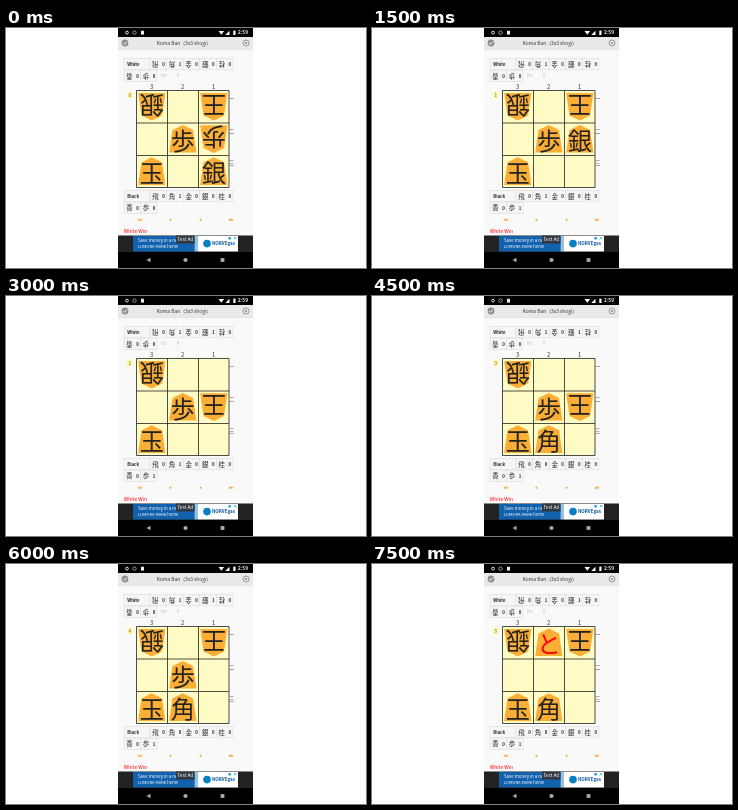
These frames come from a looping animation (360 by 240 pixels, 8000 ms). An HTML page:

```html
<!DOCTYPE html>
<html lang="ja">
<head>
<meta charset="utf-8">
<title>Mini shogi replay</title>
<style>
html, body { margin: 0; width: 100%; height: 100%; overflow: hidden; background: #fff; }
svg { display: block; width: 100vw; height: 100vh; }
text { font-family: "Noto Sans CJK JP", "Noto Sans CJK", "Noto Sans", sans-serif; }
</style>
</head>
<body>
<svg id="stage" viewBox="0 0 360 240"></svg>
<script>
const NS = 'http://www.w3.org/2000/svg';
const stage = document.getElementById('stage');
const LOOP = 8000, STEP = 1500;

function add(tag, attrs, parent = stage) {
  const node = document.createElementNS(NS, tag);
  for (const key in attrs) node.setAttribute(key, attrs[key]);
  return parent.appendChild(node);
}
const rect = (x, y, width, height, fill, more = {}) =>
  add('rect', { x, y, width, height, fill, ...more });
const circle = (cx, cy, r, fill, more = {}) => add('circle', { cx, cy, r, fill, ...more });
const path = (d, fill, more = {}) => add('path', { d, fill, ...more });
function text(value, x, y, size, fill = '#333', more = {}, parent = stage) {
  const node = add('text', { x, y, 'font-size': size, fill, ...more }, parent);
  node.textContent = value;
  return node;
}
const middle = { 'text-anchor': 'middle' };
const bold = { 'font-weight': 700 };

function drawPhone() {
  rect(112, 0, 135, 240, '#f9f9f9');
  rect(112, 0, 135, 9, '#000');
  circle(121, 4.6, 1.4, 'none', { stroke: '#ddd', 'stroke-width': 1 });
  circle(128.5, 4.6, 1.7, 'none', { stroke: '#bbb', 'stroke-width': .8 });
  rect(135, 2.8, 3, 3.8, '#eee');
  path('M212.5 3h5.6l-2.8 3.8z', '#fff');
  path('M223.5 2.7v4.2h-4.2z', '#fff');
  rect(227.3, 2.6, 2.2, 4.4, '#fff');
  text('2:59', 237, 6.4, 4.7, '#fff', { ...middle, ...bold });

  rect(112, 9, 135, 13, '#e9e9e9');
  rect(112, 21.6, 135, .5, '#ddd');
  text('Koma Ban（3x3 shogi）', 178, 17.2, 4.9, '#333', { ...middle, 'font-weight': 500 });
  circle(119, 15, 3.4, '#8c8c8c');
  path('M117.2 15l1.3 1.5 2.5-3', 'none', { stroke: '#fff', 'stroke-width': .9 });
  circle(240, 15, 3, 'none', { stroke: '#858585', 'stroke-width': .8 });
  path('M238.9 13.9l2.2 2.2m0-2.2l-2.2 2.2', 'none', { stroke: '#858585', 'stroke-width': .8 });

  rect(112, 207.5, 135, 16.5, '#222');
  rect(112, 224, 135, 16, '#000');
  path('M144.5 229.8v4.4l-4-2.2z', '#aaa');
  circle(179.5, 232, 2.1, '#aaa');
  rect(214.6, 230.1, 3.8, 3.8, '#aaa');
}

function box(x, y, width) {
  rect(x, y, width, 11.5, '#f6f6f6', { stroke: '#ddd', 'stroke-width': .6 });
}

// Returns the count labels by piece kind.
function drawHand(label, y, flipped) {
  const counts = {};
  box(118, y, 26);
  text(label, 121.3, y + 7.4, 4.3, '#222', bold);
  [...'飛角金銀桂香歩'].forEach((kind, i) => {
    const below = i > 4;
    const left = below ? 118 + (i - 5) * 16.5 : 144 + i * 16.6;
    const top = below ? y + 11.8 : y;
    box(left, top, 16.5);
    const cx = left + 5.4, cy = top + 5.8;
    text(kind, cx, cy + 2.4, 6.4, '#222',
      flipped ? { ...middle, transform: `rotate(180 ${cx} ${cy})` } : middle);
    counts[kind] = text('0', left + 13.4, top + 7.4, 4.3, '#222', { ...middle, ...bold });
  });
  return counts;
}

function drawBoard() {
  rect(130.5, 62.5, 92.5, 97, '#fffbc4');
  path('M130.5 62.5h92.5v97h-92.5zM161.5 62.5v97M192.5 62.5v97M130.5 95h92.5M130.5 127.5h92.5',
    'none', { stroke: '#222', 'stroke-width': .8 });
  [3, 2, 1].forEach((n, i) => text(n, 145.5 + i * 31, 61.2, 5.8, '#333', middle));
  [...'一二三'].forEach((n, i) => text(n, 225.5, 73.2 + i * 32, 5.2, '#333', middle));
}

function drawControls() {
  const arrow = (x, way) => path(`M${x} 190.2v3l${2.2 * way}-1.5z`, '#f5a32b');
  for (const [x, way] of [[133.4, -1], [135.6, -1], [165.2, -1], [193.8, 1], [223, 1], [225.2, 1]])
    arrow(x, way);
  text('White Win', 117.8, 204.9, 5, '#f00', { 'font-weight': 500 });
}

function drawAd() {
  rect(127, 208, 61.5, 15.5, '#1261ad');
  rect(188.5, 208, 3.5, 15.5, '#8fc4ea');
  rect(192, 208, 40, 15.5, '#fff');
  text('Save money in a new', 132, 214.2, 4.4, '#fff');
  text('LUMORA MARK home', 132, 220.4, 4.1, '#fff');
  rect(170, 207.5, 18.5, 8, '#333', { opacity: .9 });
  text('Test Ad', 179.3, 213.3, 4.8, '#fff', middle);
  circle(201, 215.6, 3.8, '#087fc4');
  text('NORVEgas', 206, 217.4, 4.5, '#07529b', bold);
  circle(223.6, 210.3, 1.4, '#22a7dc');
  path('M228 209l2.4 2.4m0-2.4l-2.4 2.4', 'none', { stroke: '#22a7dc', 'stroke-width': .7 });
}

drawPhone();
const whiteHand = drawHand('White', 30.3, true);
text('No', 155, 49.3, 4.4, '#bbb');
text('0', 172, 49.3, 4.4, '#bbb', middle);
drawBoard();
const blackHand = drawHand('Black', 162.3, false);
drawControls();
drawAd();
whiteHand['角'].textContent = '1';

rect(121, 63.6, 5.6, 6.8, '#fff7b8');
const moveNumber = text('0', 123.8, 68.6, 4.3, '#a08a10', { ...middle, ...bold });
const pieces = add('g', {});

// Rows of each position; "v" marks a piece facing down.
const positions = [
  'v銀 . v王 / . 歩 v歩 / 玉 . 銀',
  'v銀 . v王 / . 歩 銀 / 玉 . .',
  'v銀 . . / . 歩 v王 / 玉 . .',
  'v銀 . . / . 歩 v王 / 玉 角 .',
  'v銀 . v王 / . 歩 . / 玉 角 .',
  'v銀 と v王 / . . . / 玉 角 .'
].map(p => p.split(' / ').map(row => row.split(' ')));

function drawPiece(code, col, row) {
  const flipped = code[0] === 'v';
  const kind = code.slice(-1);
  const x = 145.8 + col * 31, y = 78.5 + row * 32.4;
  const g = add('g', { transform: `translate(${x} ${y}) rotate(${flipped ? 180 : 0})` }, pieces);
  add('path', { d: 'M0 -14L10.3 -9L13.6 13.6H-13.6L-10.3 -9Z', fill: '#fbae36' }, g);
  text(kind, 0, 10.7, 24.2, kind === 'と' ? '#f00' : '#222',
    { ...middle, 'font-weight': 500 }, g);
}

let shown = -1;
function show(move) {
  if (move === shown) return;
  shown = move;
  pieces.replaceChildren();
  positions[move].forEach((cells, row) => cells.forEach((code, col) => {
    if (code !== '.') drawPiece(code, col, row);
  }));
  moveNumber.textContent = move;
  whiteHand['銀'].textContent = move >= 2 ? 1 : 0;
  blackHand['歩'].textContent = move >= 1 ? 1 : 0;
  blackHand['角'].textContent = move >= 3 ? 0 : 1;
}

function tick() {
  show(Math.floor(performance.now() % LOOP / STEP));
  requestAnimationFrame(tick);
}
tick();
</script>
</body>
</html>
```
